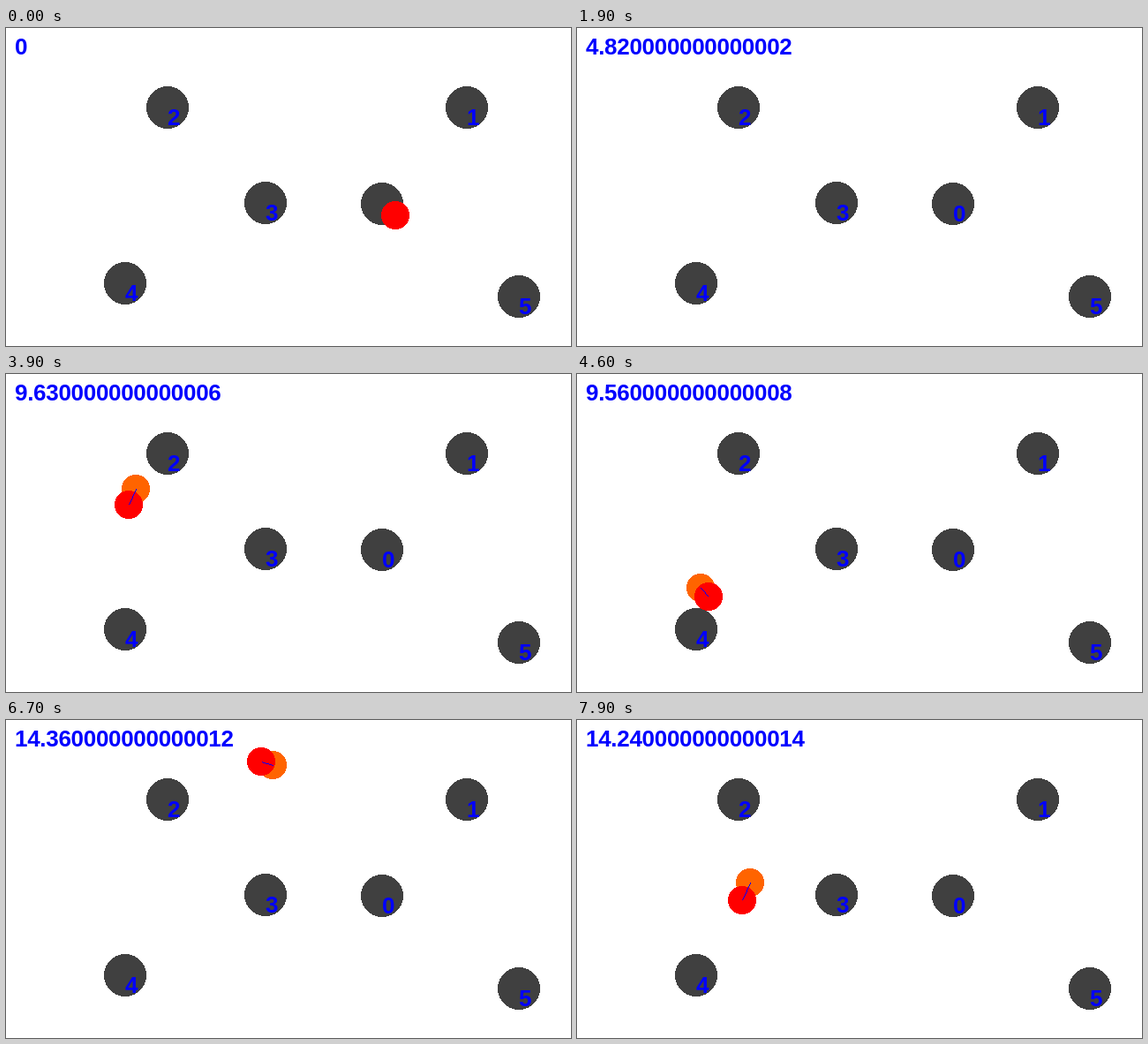
Animation, 640 px wide and 360 px high, one loop 8000 ms. Source, as an HTML page with a canvas:

```html
<!DOCTYPE html>
<html lang="en">
<head>
<meta charset="utf-8">
<title>Checkpoint race</title>
<style>
  html, body { margin: 0; width: 100%; height: 100%; overflow: hidden; background: #fff; }
  canvas { display: block; }
</style>
</head>
<body>
<canvas id="stage" width="640" height="360"></canvas>
<script>
const ctx = document.getElementById('stage').getContext('2d');
const STEP_MS = 100, STEPS = 80;
const BLUE = '#0000ff';
const GATE_RADIUS = 24, POD_RADIUS = 16;

const gates = [[426, 199], [522, 90], [183, 90], [294, 198], [135, 289], [581, 304]];

// Turning points of the flight: position and velocity per step
const turns = [
  { step: 0, pos: [441, 212], vel: [0, 0] },
  { step: 10, pos: [517, 104], vel: [9.5, -17] },
  { step: 18, pos: [484, -29], vel: [-12, -9] },
  { step: 31, pos: [264, 35], vel: [-19, 13.5] },
  { step: 35, pos: [189, 85], vel: [-18, 12.5] },
  { step: 46, pos: [149, 252], vel: [10, 8.5] },
  { step: 57, pos: [277, 195], vel: [14, -15] },
  { step: 62, pos: [324, 107], vel: [2.5, -18.5] },
  { step: 67, pos: [289, 47], vel: [-14, -1.2] },
  { step: 79, pos: [187, 204], vel: [-9.5, 20.2] }
];

// Cubic Hermite curve between neighbouring turning points
function podAt(step) {
  const next = Math.max(1, turns.findIndex(turn => turn.step >= step));
  const a = turns[next - 1], b = turns[next];
  const span = b.step - a.step, u = (step - a.step) / span;
  const blend = u * u * (3 - 2 * u);
  return [0, 1].map(k => Math.round(
    a.pos[k] + (b.pos[k] - a.pos[k]) * blend +
    span * u * (1 - u) * (a.vel[k] * (1 - u) - b.vel[k] * u)
  ));
}

// Every step costs 0.01; entering the next gate pays 5 instead
function scoreRun() {
  const scores = [0];
  let goal = 1;
  for (let step = 1; step < STEPS; step++) {
    const [x, y] = podAt(step), [gx, gy] = gates[goal];
    const reached = Math.hypot(x - gx, y - gy) < GATE_RADIUS;
    scores.push(scores[step - 1] + (reached ? 5 : -0.01));
    if (reached) goal++;
  }
  return scores;
}
const scores = scoreRun();

// Hard-edged disc, one row of pixels at a time
function disc([x, y], radius, color) {
  ctx.fillStyle = color;
  for (let row = -radius; row < radius; row++) {
    const half = Math.round(Math.sqrt(radius ** 2 - (row + 0.5) ** 2));
    ctx.fillRect(x - half, y + row, 2 * half, 1);
  }
}

// Hard-edged line, one pixel along its longer axis at a time
function line([x0, y0], [x1, y1]) {
  ctx.fillStyle = BLUE;
  const count = Math.max(Math.abs(x1 - x0), Math.abs(y1 - y0));
  for (let i = 0; i < count; i++) {
    const u = i / count;
    ctx.fillRect(Math.round(x0 + (x1 - x0) * u), Math.round(y0 + (y1 - y0) * u), 1, 1);
  }
}

function label(value, [x, y]) {
  ctx.fillStyle = BLUE;
  ctx.fillText(String(value), x, y + 20);
}

function draw(step) {
  ctx.fillStyle = '#fff';
  ctx.fillRect(0, 0, 640, 360);
  ctx.font = 'bold 26px "Liberation Sans", Arial, sans-serif';
  ctx.letterSpacing = '-0.3px';

  gates.forEach((gate, i) => {
    disc(gate, GATE_RADIUS, '#404040');
    label(i, gate);
  });

  const pod = podAt(step), last = podAt(Math.max(0, step - 1));
  disc(last, POD_RADIUS, '#ff6400');
  disc(pod, POD_RADIUS, '#ff0000');
  line(last, pod);
  label(scores[step], [10, 10]);
}

function tick() {
  draw(Math.floor(performance.now() / STEP_MS) % STEPS);
  requestAnimationFrame(tick);
}
tick();
</script>
</body>
</html>
```
